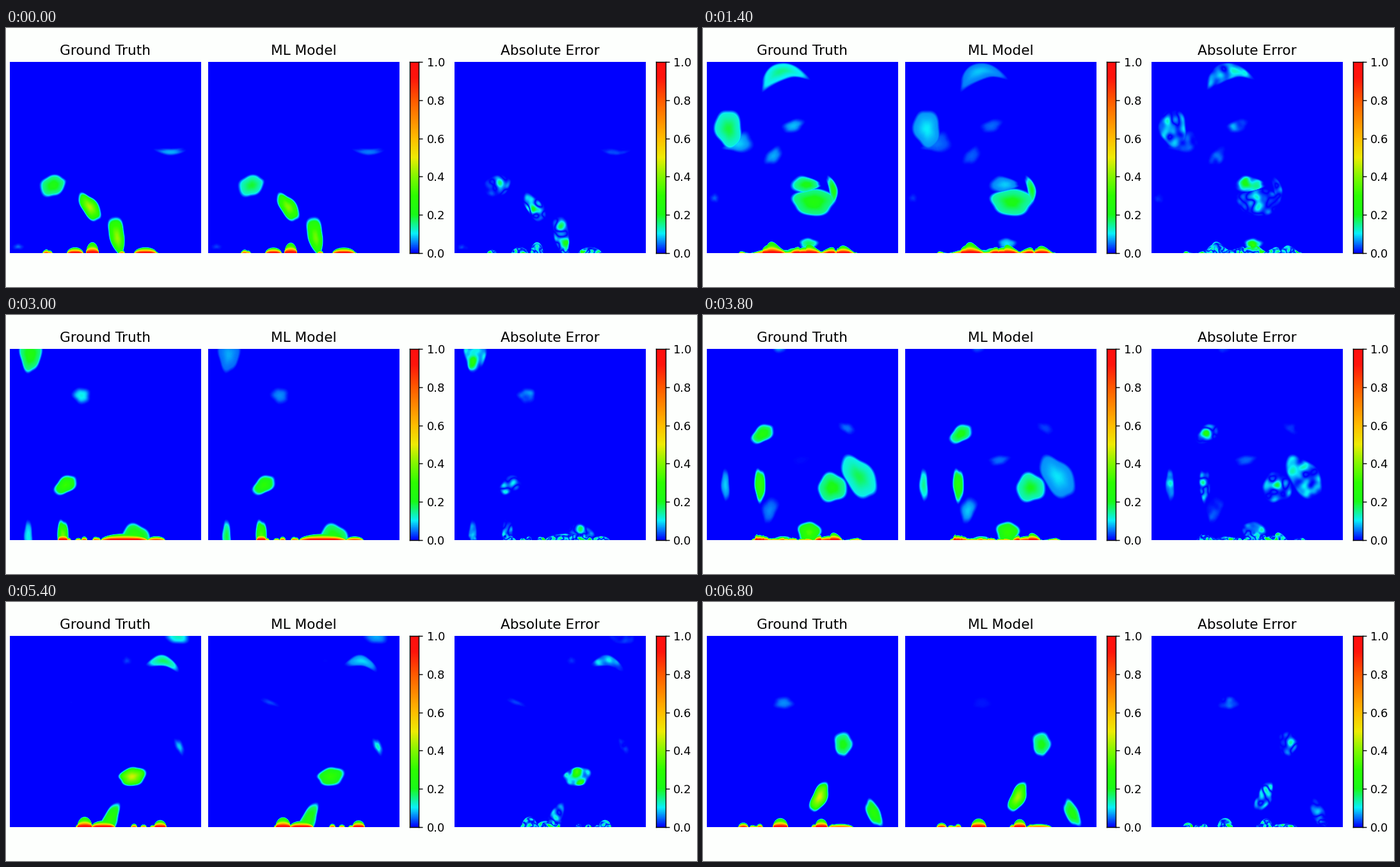
Recreate the animation shown at these times as a matplotlib script. Size 1080 by 405 pixels, loop 6.9 s.

```python
import numpy as np
import matplotlib.pyplot as plt
from matplotlib.animation import FuncAnimation
from matplotlib.colors import LinearSegmentedColormap

W, H, DPI = 1080, 405, 90
FRAMES, STEP = 69, 100
SIZE, TOP, FLOOR = 299, 53, 352
LEFT = (6, 316, 701)
RISE = 0.1  # px per ms

plt.rcParams["font.family"] = "DejaVu Sans"
STOPS = [(0, "#0000ff"), (.1, "#0af0fa"), (.2, "#19fa19"), (.3, "#2dff00"),
         (.4, "#82f800"), (.5, "#eeec05"), (.6, "#ffbe00"), (.8, "#ff5a00"),
         (.92, "#ff140c"), (1, "#ff0f0f")]
CMAP = LinearSegmentedColormap.from_list("heat", STOPS, N=512)

xs = LEFT[0] + np.arange(SIZE) + 0.5
ys = TOP + np.arange(SIZE) + 0.5
scenes = []


def smooth(u):
    u = np.clip(u, 0, 1)
    return u * u * (3 - 2 * u)


def puff(x, y, rx, ry, tilt, amp, ratio=None, taper=0, bend=0):
    """A lobed ellipse; ratio is its strength in the model panel."""
    if ratio is None:
        ratio = .9 if amp > .25 else .55
    a = np.radians(tilt)
    drop = np.hypot(rx * np.sin(a), ry * np.cos(a))
    return dict(x=x, y=y, rx=rx, ry=ry, a=a, amps=(amp, amp * ratio),
                taper=taper, bend=bend, rooted=y + drop > FLOOR + 5,
                soft=7 if amp * max(1, ratio) > .15 else 10)


def scene(t, domes, *puffs):
    """Floor domes (x, half width, height) and puffs at one key time."""
    rng = np.random.default_rng(t)
    small = [(x, 5, h) for x, h in zip(rng.uniform(60, 250, 6),
                                       rng.uniform(3, 7, 6))]
    sky = np.zeros(SIZE)
    for x, half, height in domes + small:
        arc = np.sqrt(np.clip(1 - ((xs - x) / half) ** 2, 0, 1))
        sky = np.maximum(sky, height * arc)
    scenes.append((t, sky, puffs))


scene(0, [(63, 6, 6), (108, 13, 10), (135, 10, 18), (218, 18, 10)],
      puff(74, 246, 23, 18, -25, .23, .83, taper=-.3),
      puff(131, 280, 27, 14, 55, .44),
      puff(174, 328, 34, 13, 80, .42, taper=-.6),
      puff(257, 194, 28, 7, 0, .075, .7, bend=6),
      puff(19, 342, 12, 7, 0, .05))

scene(700, [(95, 22, 9), (113, 15, 17), (172, 34, 15), (223, 14, 19)],
      puff(121, 138, 40, 15, -17, .19, bend=-22),
      puff(55, 251, 27, 16, -15, .11, taper=.5),
      puff(173, 342, 36, 23, 0, .3),
      puff(204, 323, 25, 8, 80, .28, bend=-8),
      puff(18, 336, 10, 10, 0, .05))

scene(2100, [(62, 6, 9), (122, 29, 14), (172, 11, 11), (199, 12, 11)],
      puff(40, 88, 33, 23, 80, .23),
      puff(141, 83, 21, 12, -20, .1),
      puff(110, 130, 20, 13, -45, .09),
      puff(162, 175, 25, 14, 0, .27, .4, taper=-.6),
      puff(165, 267, 17, 10, 0, .22),
      puff(141, 340, 33, 12, 95, .31),
      puff(118, 346, 26, 22, 0, .3),
      puff(25, 329, 10, 4, 90, .06))

scene(3000, [(89, 8, 12), (185, 37, 11), (235, 14, 7)],
      puff(38, 62, 30, 19, 90, .24, .3, taper=-.2),
      puff(118, 126, 17, 15, 20, .11),
      puff(93, 266, 22, 14, -35, .31),
      puff(89, 346, 29, 10, 88, .38),
      puff(35, 346, 28, 8, 88, .11, 1.7),
      puff(202, 350, 25, 25, 0, .28))

scene(4600, [(115, 22, 11), (180, 5, 12), (208, 9, 9)],
      puff(225, 97, 17, 10, 25, .06),
      puff(244, 173, 40, 24, 55, .22),
      puff(104, 226, 24, 14, 105, .07, 1.5, taper=-.4),
      puff(166, 260, 20, 19, 0, .42),
      puff(123, 346, 28, 15, 95, .3),
      puff(180, 346, 31, 8, 88, .34),
      puff(153, 147, 20, 10, -10, .006, 10))

scene(5400, [(123, 12, 17), (152, 19, 11), (241, 10, 12)],
      puff(246, 92, 28, 10, 10, .17, bend=-12),
      puff(269, 54, 22, 14, 0, .13),
      puff(189, 92, 10, 9, 0, .028, .1),
      puff(271, 226, 17, 8, 65, .085, 1.5),
      puff(197, 273, 23, 16, -10, .47, .65, taper=.2),
      puff(162, 342, 32, 13, 115, .29),
      puff(102, 157, 20, 6, 20, .002, 15))

scene(6800, [(63, 8, 8), (121, 12, 15), (185, 10, 14), (215, 20, 6)],
      puff(126, 158, 19, 12, 0, .06, .15),
      puff(219, 223, 21, 16, 90, .22, 1, taper=-.3),
      puff(182, 305, 27, 13, 115, .48),
      puff(267, 330, 25, 12, 65, .27))

KEYS = [s[0] for s in scenes]


def noise(seed, scale):
    rng = np.random.default_rng(seed)
    f = np.fft.fftfreq(SIZE)
    low = np.exp(-2 * (np.pi * scale) ** 2 * (f[:, None] ** 2 + f ** 2))
    n = np.fft.ifft2(np.fft.fft2(rng.normal(size=(SIZE, SIZE))) * low).real
    return n / n.std()


COARSE, FINE = noise(4, 4.5), noise(9, 1.8)


def bed(h):
    z = (FLOOR - ys)[:, None]
    heat = .25 + .75 * np.minimum(1, h / 9) * np.exp(-(z / (.35 * h + 1)) ** 2)
    return heat * smooth((h - z) / 3)


def presence(k, t):
    dt = t - KEYS[k]
    other = k + (1 if dt > 0 else -1)
    if dt == 0 or not 0 <= other < len(KEYS):
        return 1.0
    gap = abs(KEYS[other] - KEYS[k])
    return float(smooth((gap - abs(dt)) / (.7 * gap)))


def paint(p, dt, weight, panels):
    lift, grow = RISE * dt, 1.0
    if p["rooted"] and dt < 0:
        lift, grow = 0, max(.2, 1 + dt / 700)
    y = FLOOR + (ys + lift - FLOOR) / grow
    reach = 1.3 * max(p["rx"], p["ry"]) + abs(p["bend"])
    rows = np.flatnonzero(np.abs(y - p["y"]) < reach)
    cols = np.flatnonzero(np.abs(xs - p["x"]) < reach)
    if not len(rows) or not len(cols):
        return
    box = np.s_[rows[0]:rows[-1] + 1, cols[0]:cols[-1] + 1]
    dx, dy = xs[cols] - p["x"], y[rows][:, None] - p["y"]
    c, s = np.cos(p["a"]), np.sin(p["a"])
    u = (dx * c + dy * s) / p["rx"]
    v = (dy * c - dx * s + p["bend"] * u * u) / p["ry"]
    v = v / np.clip(1 + p["taper"] * u, .2, 2)
    ang = np.arctan2(v, u)
    lobes = 1 + .06 * np.sin(3 * ang + p["x"]) + .04 * np.sin(5 * ang + p["y"])
    rho = np.hypot(u, v) / lobes
    mask = smooth((1 - rho) * np.sqrt(p["rx"] * p["ry"]) / p["soft"])
    body = weight * mask * (.6 + .4 * np.exp(-4 * rho ** 2))
    for field, amp in zip(panels, p["amps"]):
        np.maximum(field[box], amp * body, out=field[box])


def fields(t):
    k = min(np.searchsorted(KEYS, t, side="right") - 1, len(KEYS) - 2)
    f = (t - KEYS[k]) / (KEYS[k + 1] - KEYS[k])
    h = scenes[k][1] + (scenes[k + 1][1] - scenes[k][1]) * smooth(f)
    h = h * (1 + .5 * np.sin(np.pi * f) * np.sin(xs / 9 + t / 90))
    truth, model = bed(h), bed(.96 * h)
    for j, (key, _, puffs) in enumerate(scenes):
        weight = presence(j, t)
        if weight > 0:
            for p in puffs:
                paint(p, t - key, weight, (truth, model))
    shift = -int(t / 50)
    near = np.exp(-((FLOOR - ys) / 9) ** 2)[:, None]
    n = (1 - near) * np.roll(COARSE, shift, 0) + near * np.roll(FINE, shift, 1)
    diff = np.clip(truth - model, -.2, .2)
    return truth, model, np.abs(diff + .3 * np.minimum(truth, .3) * n)


fig = plt.figure(figsize=(W / DPI, H / DPI), dpi=DPI, facecolor="#fdfffd")


def axes(x, w):
    return fig.add_axes([x / W, 1 - FLOOR / H, w / W, SIZE / H])


images = []
for x, name in zip(LEFT, ("Ground Truth", "ML Model", "Absolute Error")):
    ax = axes(x, SIZE)
    ax.axis("off")
    images.append(ax.imshow(np.zeros((SIZE, SIZE)), cmap=CMAP, vmin=0, vmax=1,
                            aspect="auto", interpolation="nearest"))
    fig.text((x + SIZE / 2) / W, 1 - 42 / H, name, size=17.33,
             ha="center", va="baseline")

for x in (630.5, 1015.5):
    ax = axes(x, 15)
    ax.imshow(np.linspace(0, 1, 256)[:, None], cmap=CMAP, origin="lower",
              aspect="auto", extent=(0, 1, 0, 1))
    ax.set_xticks([])
    ax.set_yticks(np.arange(6) / 5)
    ax.yaxis.tick_right()
    ax.tick_params(length=5.06, width=1.16, pad=5.06, labelsize=14.44)
    for side in ax.spines.values():
        side.set_linewidth(1.16)


def draw(i):
    for im, data in zip(images, fields(i * STEP)):
        im.set_data(data)
    return images


anim = FuncAnimation(fig, draw, frames=FRAMES, interval=STEP, repeat=True,
                     repeat_delay=0, blit=False)
plt.show()
```
